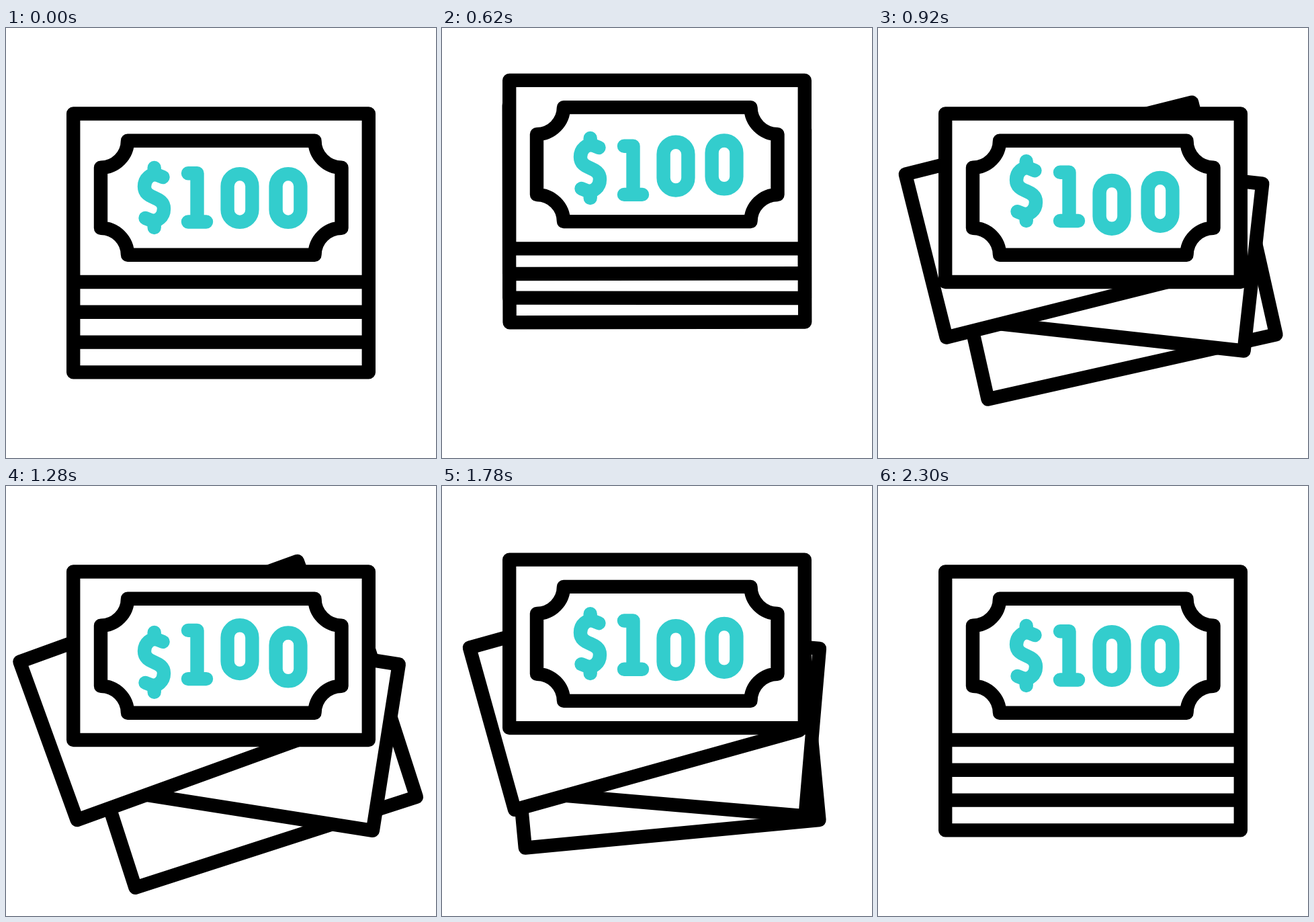
An HTML page with a canvas for the animation above (2.4 s loop, 640 px wide and 640 px high).

```html
<!DOCTYPE html>
<html lang="en">
<head>
<meta charset="utf-8">
<title>Banknotes</title>
<style>
html, body { margin: 0; width: 100%; height: 100%; overflow: hidden; background: #fff; }
canvas { display: block; width: 100vmin; height: 100vmin; }
</style>
</head>
<body>
<canvas id="stage" width="640" height="640"></canvas>
<script>
const ctx = document.getElementById('stage').getContext('2d');
const LOOP = 2400;
const INK = '#000';
const TEAL = '#33cdcd';
const NOTE = { x: 320, y: 252.75, w: 439.6, h: 250.5 };
const GAP = 44.8;

// Eased value of a list of [time, value] keys.
function track(t, keys) {
  if (t <= keys[0][0]) return keys[0][1];
  for (let i = 1; i < keys.length; i++) {
    const [t0, a] = keys[i - 1];
    const [t1, b] = keys[i];
    if (t < t1) {
      const p = (t - t0) / (t1 - t0);
      return a + (b - a) * p * p * (3 - 2 * p);
    }
  }
  return keys[keys.length - 1][1];
}

// Notes behind the front one, nearest first.
const backNotes = [
  { lift: -57.5, dx: -50.3, dy: 7, angle: -19.9, move: [1520, 2200], turn: [1600, 2200] },
  { lift: -66.2, dx: 28.2, dy: 12.6, angle: 8.95, move: [1400, 2100], turn: [1500, 2100] },
  { lift: -75, dx: 43.2, dy: 24, angle: -17.9, move: [1310, 2010], turn: [1400, 2000] }
];

const fan = (value, [start, end]) => [[600, 0], [1100, value], [start, value], [end, 0]];
const frontKeys = [[200, 0], [600, -50.3], [900, 0], [1500, 0], [1920, -24], [2200, 0]];
const bobKeys = [[100, 0], [500, 10], [900, -10], [1300, 10], [1700, 0]];

const plate = new Path2D(
  'M181 167.7H459.5A40 40 0 0 0 499.5 207.7V297.7A40 40 0 0 0 459.5 337.7' +
  'H181A40 40 0 0 0 141 297.7V207.7A40 40 0 0 0 181 167.7Z');
const zero = x => `M${x} 235.5a18.4 18.4 0 0 1 36.8 0v35a18.4 18.4 0 0 1 -36.8 0z`;
const glyphs = [
  'M233.5 222L226 219C216 215.5 206 224 206 236C206 256 235 249 235 269' +
  'C235 281 225 289.5 215 286L207.5 283M220.7 208V218M220.7 287V297',
  'M271 216.3H284.5V288.5M271 288.5H298',
  zero(329.6),
  zero(401.6)
].map(d => new Path2D(d));

function drawNote(x, y, degrees) {
  ctx.save();
  ctx.translate(NOTE.x + x, NOTE.y + y);
  ctx.rotate(degrees * Math.PI / 180);
  ctx.beginPath();
  ctx.rect(-NOTE.w / 2, -NOTE.h / 2, NOTE.w, NOTE.h);
  ctx.fill();
  ctx.stroke();
  ctx.restore();
}

function draw(t) {
  ctx.fillStyle = '#fff';
  ctx.fillRect(0, 0, 640, 640);
  ctx.lineWidth = 20.4;
  ctx.lineJoin = ctx.lineCap = 'round';
  ctx.strokeStyle = INK;

  for (let i = backNotes.length - 1; i >= 0; i--) {
    const n = backNotes[i];
    const x = track(t, fan(n.dx, n.move));
    const y = track(t, [[200, 0], [600, n.lift], ...fan(n.dy, n.move).slice(1)]);
    drawNote(x, y + GAP * (i + 1), track(t, fan(n.angle, n.turn)));
  }

  const frontY = track(t, frontKeys);
  drawNote(0, frontY, 0);
  ctx.save();
  ctx.translate(0, frontY);
  ctx.stroke(plate);
  ctx.strokeStyle = TEAL;
  glyphs.forEach((glyph, i) => {
    ctx.save();
    ctx.translate(0, track(t - i * 200, bobKeys));
    ctx.stroke(glyph);
    ctx.restore();
  });
  ctx.restore();
}

function frame() {
  draw(performance.now() % LOOP);
  requestAnimationFrame(frame);
}
frame();
</script>
</body>
</html>
```
